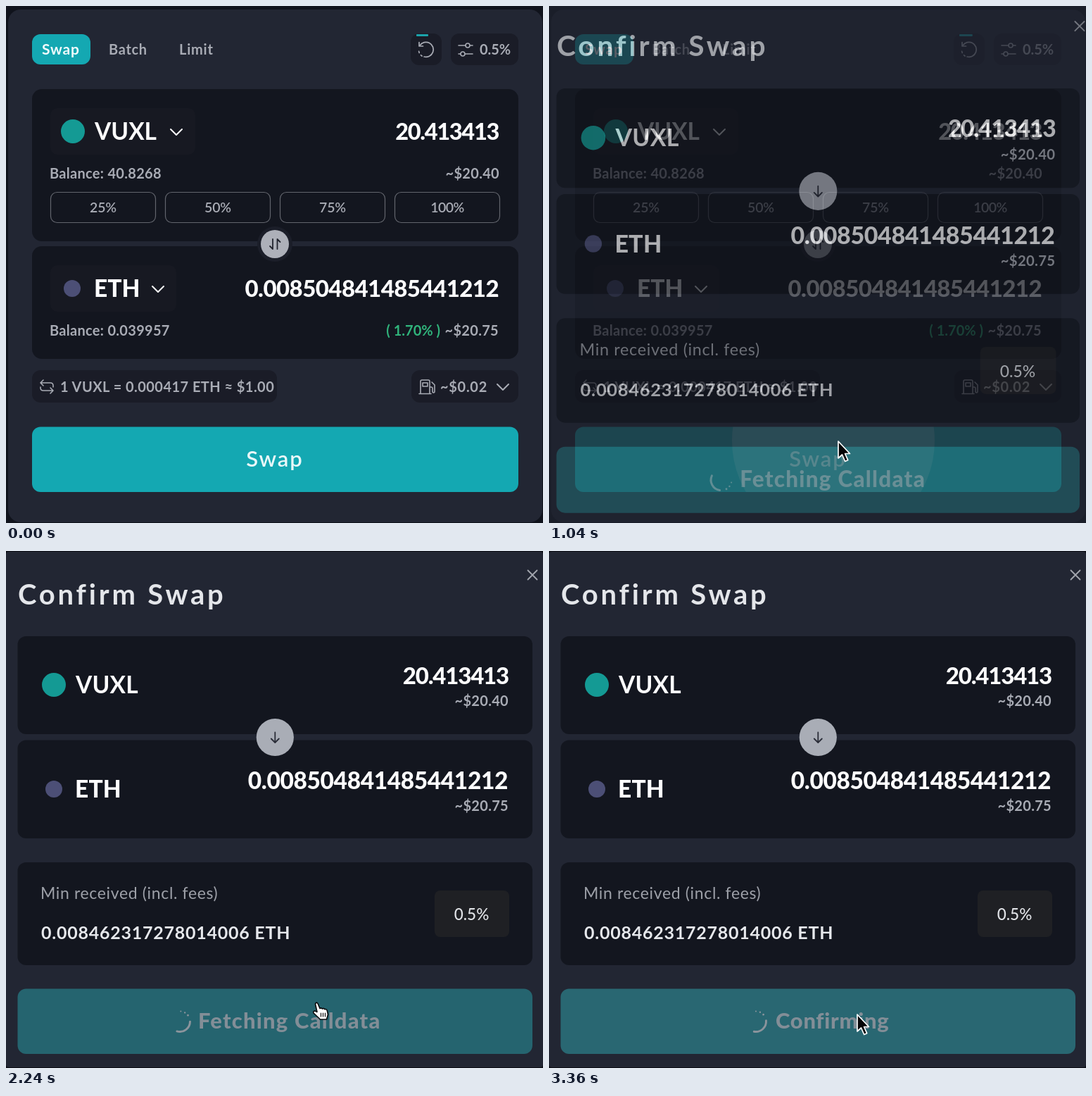
These frames come from a looping animation (763x734 px, 3440 ms). An HTML page:

```html
<!DOCTYPE html>
<html lang="en">
<head>
<meta charset="utf-8">
<title>Token swap</title>
<style>
  html, body { margin: 0; width: 100%; height: 100%; overflow: hidden; background: #0c0e16; }
  svg { display: block; width: 763px; height: 734px; }
  text { font-family: Lato, "Open Sans", sans-serif; white-space: pre; }
  .line { fill: none; stroke-linecap: round; stroke-linejoin: round; }
</style>
</head>
<body>
<svg id="stage" viewBox="0 0 763 734"></svg>
<script>
const LOOP = 3440, STEP = 80;
const TEAL = [20, 168, 178], HOVER = [23, 160, 168], OFF = [37, 100, 111];
const GREY = '#a9acb5', WHITE = '#fdfdfe', CARD = '#13161f', PILL = '#1a1c27';
const TOKEN = 'VUXL', AMOUNT = '20.413413', OUT = '0.008504841485441212';

const rect = (x, y, x2, y2, r, fill, more = '') =>
  `<rect x="${x}" y="${y}" width="${x2 - x}" height="${y2 - y}" rx="${r}" fill="${fill}" ${more}/>`;
const circle = (x, y, r, fill) => `<circle cx="${x}" cy="${y}" r="${r}" fill="${fill}"/>`;
const line = (d, color, width = 1.6, more = '') =>
  `<path class="line" d="${d}" stroke="${color}" stroke-width="${width}" ${more}/>`;
const label = (str, x, y, size, { w = 700, color = GREY, ls = 0.3, at = 'start', id = '' } = {}) =>
  `<text ${id && `id="${id}"`} x="${x}" y="${y}" font-size="${size}" font-weight="${w}" fill="${color}" letter-spacing="${ls}" text-anchor="${at}">${str}</text>`;
const chevron = (x, y, color) => line(`M${x - 8} ${y - 4}l8 8 8-8`, color, 2);

// Main form
function form() {
  const right = { at: 'end' };
  const percents = [25, 50, 75, 100].map((n, i) => {
    const x = 63.5 + i * 163;
    return rect(x, 264.5, x + 149, 307.5, 9, 'none', 'stroke="#62656d" stroke-width="1.2"') +
      label(n + '%', x + 74.5, 293, 19.5, { w: 600, ls: n > 99 ? -0.5 : -0.1, at: 'middle' });
  }).join('');
  return rect(3, 5, 762, 733, 18, '#222633') +
    rect(37, 40, 120, 83, 12, '#14a8b2') +
    label('Swap', 51, 69, 21, { color: '#f1fbfc', ls: 0.8 }) +
    label('Batch', 146, 69, 20, { ls: 0.7 }) +
    label('Limit', 246, 69, 20, { ls: 0.8 }) +
    rect(575, 39, 619, 84, 12, PILL) +
    '<rect id="countdown" x="583" y="40" height="3" rx="1" fill="#1ba3ab"/>' +
    line('M588 56A10.5 10.5 0 1 1 594 72', GREY, 1.7) +
    line('M591 71A10.5 10.5 0 0 1 586.5 61', GREY, 1.7, 'stroke-dasharray="2 4"') +
    line('M587 51.5v5.5h5.5', GREY, 1.7) +
    rect(632, 39, 728, 84, 12, PILL) +
    line('M643 56h10M659 56h4M643 68h3M652 68h11', GREY) +
    '<g fill="none" stroke="#a9acb5" stroke-width="1.6"><circle cx="656" cy="56" r="3"/><circle cx="649" cy="68" r="3"/></g>' +
    label('0.5%', 673, 69, 20, { ls: -0.1 }) +

    rect(37, 118, 728, 334, 14, CARD) +
    rect(63, 145, 269, 211, 10, '#171922') +
    circle(95, 178, 17, '#149a94') +
    label(TOKEN, 126, 190, 33.5, { color: WHITE, ls: 0 }) +
    chevron(242, 179, WHITE) +
    label(AMOUNT, 700, 190, 32.5, { w: 800, color: WHITE, ls: -1.3, ...right }) +
    label('Balance: 40.8268', 62, 245, 20) +
    label('~$20.40', 701, 245, 20, right) +
    percents +

    rect(37, 341, 728, 501, 14, CARD) +
    rect(63, 368, 242, 434, 10, '#171922') +
    circle(94, 401, 12, '#4c4f76') +
    label('ETH', 125, 413, 33.5, { w: 800, color: WHITE, ls: 0 }) +
    chevron(216, 402, WHITE) +
    label(OUT, 700, 413, 33, { w: 800, color: WHITE, ls: -0.55, ...right }) +
    label('Balance: 0.039957', 62, 468, 20) +
    label('( 1.70% )', 617, 468, 20, { color: '#30b37b', ls: 0, ...right }) +
    label('~$20.75', 700, 468, 20, right) +
    circle(382, 338, 25, '#1b1e29') + circle(382, 338, 20, '#adb0b9') +
    line('M379 331v14l-4-4M385.5 345v-14l4 4', '#22252f', 1.8) +

    rect(37, 517, 385, 563, 12, PILL) +
    line('M53 531l-4 4 4 4M49 535h14q4 0 4 4v2M63 542l4 4-4 4M67 546h-14q-4 0-4-4v-1', GREY) +
    label(`1 ${TOKEN} = 0.000417 ETH ≈ $1.00`, 77, 548, 20, { ls: 0.45 }) +
    rect(576, 517, 728, 563, 12, PILL) +
    line('M589 550v-17q0-2 2-2h9q2 0 2 2v17M587 550.5h17M592 535h7v5h-7zM602 541h2q2 0 2 2v4q0 2 1.5 2t1.5-2v-9l-4-4', GREY) +
    label('~$0.02', 617, 548, 20, { ls: 0.7 }) +
    chevron(706, 541, GREY) +
    rect(37, 597.5, 728, 690, 12, '#14a8b2', 'id="swapBtn"') +
    '<g clip-path="url(#clipSwap)"><circle id="ripple1" cx="404" cy="617" fill="#fff"/></g>' +
    label('Swap', 382, 654, 31, { w: 600, color: '#e9f7f8', ls: 1.9, at: 'middle' });
}

// Confirmation dialog
function dialog() {
  const right = { at: 'end' };
  return rect(0, 1, 763, 733, 4, '#222633') +
    line('M741.5 27.5l13 13M754.5 27.5l-13 13', '#a3a6ae', 1.8) +
    label('Confirm Swap', 17, 76, 40, { color: '#e4e6ea', ls: 3.8 }) +
    rect(16.5, 121, 748, 260, 12, CARD) +
    circle(68, 190, 17, '#149a94') +
    label(TOKEN, 99, 202, 33.5, { color: WHITE, ls: 0.2 }) +
    label(AMOUNT, 714, 189, 33, { w: 800, color: WHITE, ls: -1.2, ...right }) +
    label('~$20.40', 714, 220, 20, right) +
    rect(16.5, 268.5, 748, 408, 12, CARD) +
    circle(68, 338, 12, '#4c4f76') +
    label('ETH', 98, 350, 33.5, { w: 800, color: WHITE, ls: 0.2 }) +
    label(OUT, 713, 338, 33.5, { w: 800, color: WHITE, ls: -0.4, ...right }) +
    label('~$20.75', 714, 369, 20, right) +
    circle(382.3, 264.5, 26.6, '#a9adb6') +
    line('M382.3 257.5v14M376.8 266.5l5.5 5.5 5.5-5.5', '#2a2d38', 1.8) +
    rect(16.5, 442, 748, 588, 12, CARD) +
    label('Min received (incl. fees)', 49, 494, 23, { w: 400, color: '#9da0a8', ls: 0.65 }) +
    label('0.008462317278014006 ETH', 50, 551, 25, { color: '#e6e8ec', ls: 0.75 }) +
    rect(609, 482, 715, 548, 8, '#1f2024') +
    label('0.5%', 661.5, 524, 22.5, { w: 500, color: '#e1e3e7', ls: 0, at: 'middle' }) +
    rect(16.5, 621.5, 748, 714, 12, '#25646f', 'id="okBtn"') +
    '<g clip-path="url(#clipOk)"><circle id="ripple2" cx="440" cy="655" fill="#fff"/></g>' +
    `<g id="spinner">${spinner()}</g>` +
    label('', 0, 678, 31, { w: 800, id: 'okText' });
}

function spinner() {
  const at = (deg, r = 14.5) => [Math.cos(deg * Math.PI / 180) * r, Math.sin(deg * Math.PI / 180) * r];
  const dots = [-85, -61, -38].map((a, i) => circle(...at(a), 1 + i * 0.2, '#8b949c')).join('');
  return dots + line(`M${at(0)}A14.5 14.5 0 0 1 ${at(106)}`, '#8b949c', 2.9);
}

const arrow = '<path d="M1 1V25L6.5 20 10.7 29.5 14.7 27.7 10.6 18.5H17.5Z" fill="#060608" stroke="#fff" stroke-width="1.7" stroke-linejoin="round"/>';
const hand = '<path d="M1.5 3Q3-.5 5 2.5L8 9.5Q9.5 8 11.5 10 13.5 8.5 15 10.7 17.5 10 18.3 12.5L19.5 18 17.5 25H8.5L-1 16Q-2 13 1 13L4 14.5Z" fill="#fff" stroke="#0a0a0c" stroke-width="1.6" stroke-linejoin="round"/>' +
  line('M9.5 16v5M12.5 16v5M15.5 16v5', '#0a0a0c', 1.2);

const stage = document.getElementById('stage');
stage.innerHTML =
  `<defs><clipPath id="clipSwap">${rect(37, 597.5, 728, 690, 12, '#000')}</clipPath>` +
  `<clipPath id="clipOk">${rect(16.5, 621.5, 748, 714, 12, '#000')}</clipPath></defs>` +
  rect(0, 0, 763, 734, 0, '#10131c') + form() +
  rect(0, 0, 763, 734, 0, '#000', 'id="shade"') +
  `<g id="dialog">${dialog()}</g>` +
  `<g id="cursor"><g id="arrow">${arrow}</g><g id="hand">${hand}</g></g>`;

const el = {};
stage.querySelectorAll('[id]').forEach(n => el[n.id] = n);
const set = (id, attrs) => { for (const k in attrs) el[id].setAttribute(k, attrs[k]); };
const show = (id, on) => set(id, { visibility: on ? 'visible' : 'hidden' });
const clamp = v => Math.min(1, Math.max(0, v));
const ramp = (t, start, span) => clamp((t - start) / span);
const mix = (a, b, k) => `rgb(${a.map((v, i) => Math.round(v + (b[i] - v) * k))})`;

// time, x, y of the pointer tip
const PATH = [
  [320, 446, 566], [560, 416, 602], [800, 410, 617], [1840, 410, 617],
  [2240, 438, 640], [2560, 443, 648], [2800, 437, 657], [LOOP, 437, 657]
];
function pointer(t) {
  const i = Math.max(1, PATH.findIndex(p => p[0] >= t));
  const [a, b] = [PATH[i - 1], PATH[i]];
  const u = ramp(t, a[0], b[0] - a[0]), k = u * u * (3 - 2 * u);
  return [a[1] + (b[1] - a[1]) * k, a[2] + (b[2] - a[2]) * k];
}

function ripple(id, age) {
  const on = age > 0 && age < 600;
  set(id, { r: on ? age * 0.9 : 0, opacity: on ? 0.3 * (1 - age / 600) : 0 });
}

const READY = 2400, CLICKED = 2800;
const phases = [
  { until: READY, text: 'Fetching Calldata', x: 273, ls: 1.2, spin: 247, angle: t => 295 + (t - 1280) / 440 * 360 },
  { until: CLICKED, text: 'Confirm', x: 322, ls: 0.6 },
  { until: Infinity, text: 'Confirming', x: 322, ls: 0.7, spin: 294, angle: t => 355 + (t - 3360) / 440 * 360 }
];

function draw(t) {
  set('countdown', { width: 17 + t * 0.0017 });
  set('swapBtn', { fill: mix(TEAL, HOVER, ramp(t, 360, 200)) });
  ripple('ripple1', t - 880);
  ripple('ripple2', t - CLICKED);

  const u = ramp(t, 900, 340), p = 1 - (1 - u) ** 2;
  set('shade', { opacity: 0.3 * p });
  set('dialog', {
    opacity: p,
    transform: `translate(382 365) scale(${1.047 - 0.047 * p}) translate(-382 -365)`
  });

  const phase = phases.find(s => t < s.until);
  const lit = t < CLICKED ? ramp(t, READY + 30, 200) : 1 - ramp(t, CLICKED, 200);
  set('okBtn', { fill: mix(OFF, HOVER, lit) });
  el.okText.textContent = phase.text;
  set('okText', { x: phase.x, 'letter-spacing': phase.ls, fill: phase.spin ? '#838e97' : '#dde3e7' });
  show('spinner', phase.spin);
  if (phase.spin) set('spinner', { transform: `translate(${phase.spin} 668) rotate(${phase.angle(t)})` });

  const pointing = t >= 2080 && t < READY;
  set('cursor', { transform: `translate(${pointer(t)})` });
  show('arrow', t >= 320 && !pointing);
  show('hand', pointing);
}

const begin = performance.now();
function tick() {
  const t = (performance.now() - begin) % LOOP;
  draw(Math.floor(t / STEP) * STEP);
  requestAnimationFrame(tick);
}
tick();
</script>
</body>
</html>
```
